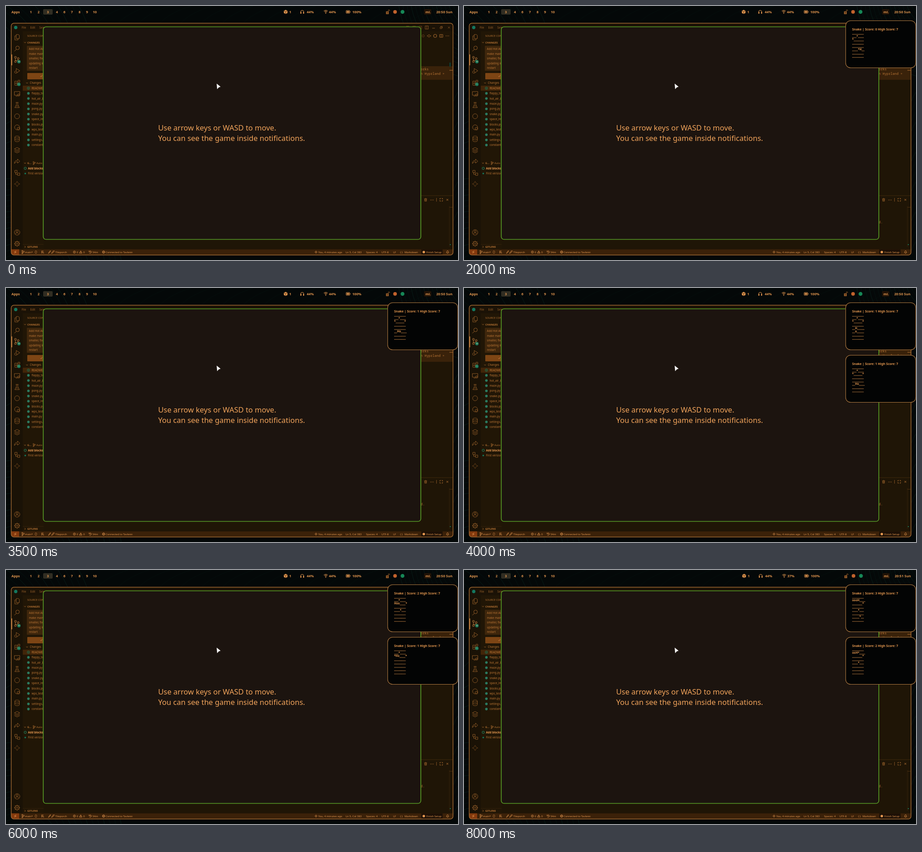
These frames come from a looping animation (998x561 px, 8.5 s). An HTML page with a canvas:

```html
<!DOCTYPE html>
<html lang="en">
<head>
<meta charset="utf-8">
<title>Snake in notifications</title>
<style>
html, body { margin: 0; width: 100%; height: 100%; overflow: hidden; background: #040808; }
canvas { display: block; }
</style>
</head>
<body>
<canvas id="stage" width="998" height="561"></canvas>
<script>
const ctx = document.getElementById('stage').getContext('2d');
const LOOP = 8500, STEP = 500;
const SANS = '"Noto Sans", "Open Sans", sans-serif';
const MONO = '"Noto Sans Mono", monospace';
const BRIGHT = '#e2964f', TEXT = '#b87434', DIM = '#98602a', FAINT = '#6a421b', TEAL = '#157a5c';

function text(str, x, y, size = 6.2, color = TEXT, weight = 400, family = SANS) {
  ctx.font = `${weight} ${size}px ${family}`;
  ctx.fillStyle = color;
  ctx.fillText(str, x, y + size * 0.35);
  return ctx.measureText(str).width;
}
function rect(x, y, w, h, color) {
  ctx.fillStyle = color;
  ctx.fillRect(x, y, w, h);
}
function panel(x, y, w, h, r, fill, stroke, lineWidth = 1) {
  ctx.beginPath();
  ctx.roundRect(x, y, w, h, r);
  if (fill) { ctx.fillStyle = fill; ctx.fill(); }
  if (stroke) { ctx.strokeStyle = stroke; ctx.lineWidth = lineWidth; ctx.stroke(); }
}
function disc(x, y, r, color) {
  ctx.beginPath();
  ctx.arc(x, y, r, 0, 7);
  ctx.fillStyle = color;
  ctx.fill();
}
function ring(x, y, r, color = DIM, w = 0.9, from = 0, to = Math.PI * 2) {
  ctx.beginPath();
  ctx.arc(x, y, r, from, to);
  ctx.strokeStyle = color;
  ctx.lineWidth = w;
  ctx.stroke();
}
// SVG path data placed at x, y
function path(x, y, d, color = DIM, w = 0.9, filled = false) {
  const p = new Path2D(d);
  ctx.save();
  ctx.translate(x, y);
  ctx.strokeStyle = ctx.fillStyle = color;
  ctx.lineWidth = w;
  if (filled) ctx.fill(p); else ctx.stroke(p);
  ctx.restore();
}
function branch(x, y, s, color) {
  ring(x - 2 * s, y - 3.5 * s, 1.5 * s, color, 0.8);
  ring(x - 2 * s, y + 3.5 * s, 1.5 * s, color, 0.8);
  ring(x + 2.5 * s, y - 1.5 * s, 1.5 * s, color, 0.8);
  path(x, y, `M${-2 * s} ${-2 * s}V${2 * s}Q${2.5 * s} ${2 * s} ${2.5 * s} 0`, color, 0.8);
}

function wallpaper() {
  rect(0, 0, 998, 561, '#040808');
  for (let i = 0; i < 16; i++) {
    const shade = i % 3 ? '#071613' : '#0a211c';
    ring(-70, 130, 70 + i * 13, shade, 0.8, -1.4, 1.2);
    ring(1060, -30, 60 + i * 9, shade, 0.8);
    ring(30, 610, 50 + i * 12, shade, 0.8);
    path(200 + i * 46, 0, 'M0 40Q20 16 70 0', '#06110f', 0.8);
    path(988, 190 + i * 22, 'M0 20Q4 8 10 0', shade, 0.8);
  }
}

function topBar(step) {
  const dx = step >= 14 ? 1 : 0;
  const label = (s, x) => text(s, x, 13, 7.6, BRIGHT, 600);
  label('Apps', 12);
  panel(82, 7, 21, 12, 2, '#302d22');
  ctx.textAlign = 'center';
  [55, 72, 92.5, 112.5, 129, 145.5, 162.5, 179, 196].forEach((x, i) =>
    label(['1', '2', '3', '4', '6', '7', '8', '9', '10'][i], x));
  ctx.textAlign = 'left';

  ctx.save();
  ctx.translate(dx, 0);
  path(617.5, 13, 'M0-4.5L4-2.5V2.5L0 4.5L-4 2.5V-2.5Z', BRIGHT, 1, true);
  path(617.5, 13, 'M-4-2.5L0-.4L4-2.5M0-.4V4', '#1a1008', 0.7);
  label('1', 625.5);
  path(654, 13, 'M-3.5 3V0A3.5 3.5 0 0 1 3.5 0V3', BRIGHT, 1);
  rect(650, 13, 2.2, 4, BRIGHT);
  rect(656, 13, 2.2, 4, BRIGHT);
  label('44%', 664);
  for (const r of [2.5, 4.5, 6.5]) ring(706, 16, r, BRIGHT, 1, -2.3, -0.84);
  disc(706, 16, 1, BRIGHT);
  label(step >= 15 ? '37%' : '44%', 713);
  panel(751, 10, 8, 6, 1, null, BRIGHT);
  rect(752.3, 11.3, 5.4, 3.4, BRIGHT);
  rect(759.5, 12, 1, 2, BRIGHT);
  label('100%', 764.7);
  rect(839, 12, 6, 6, '#a0622c');
  path(845, 10, 'M-1 2V0A1.5 1.5 0 0 1 2 0V1', '#a0622c', 1);
  path(842, 15, 'M-2 0H2M0-2V2', '#24150a', 0.7);
  disc(859, 13, 4, '#c2622c');
  disc(875.5, 13, 4.2, '#168857');
  panel(923, 7, 16, 12, 2, '#211307');
  label('ml.', 926);
  label(step >= 14 ? '20:51 Sun' : '20:50 Sun', 950);
  ctx.restore();
}

function activityBar() {
  const x = 24.5;
  path(x, 69, 'M-2-6H3L5-4V3H-2ZM-2-3H-5V6H2V3');
  ring(x + 1, 92.5, 4, DIM, 1);
  path(x, 94, 'M-2 2L-6 6', DIM, 1);
  rect(12, 107, 1.5, 24, BRIGHT);
  branch(x - 1, 118, 1.35, BRIGHT);
  path(x, 144, 'M-2-6L6-1L-1 4M-2-6V-1');
  ring(x - 3, 146, 2.5);
  path(x, 169, 'M-5-3H0V6H-5ZM-5 1.5H5V6H0M2-5H6V-1H2Z');
  path(x, 194, 'M-6-5H6V3H-6ZM-3 5H1');
  ring(x + 3.5, 196.5, 2.5);
  path(x, 219, 'M-3-6H3M-1.5-6V-1L-5 5.5H5L1.5-1V-6M-3 2H3');
  ring(x, 243.5, 5.5);
  ring(x, 268, 5.5);
  ring(x + 3, 271, 3);
  path(x, 293.5, 'M-5-4C-5-7 5-7 5-4S-5-1-5-4V4C-5 7 5 7 5 4V-4M-5 0C-5 3 5 3 5 0');
  path(x, 318.5, 'M0-6L6-3L0 0L-6-3ZM-6 0L0 3L6 0M-6 3L0 6L6 3');
  path(x, 343, 'M-6 5C-6-1-2-2 1-2V-5L6 0L1 4V1C-2 1-4 2-6 5');
  path(x, 368, 'M-5-5H0V0H-5ZM1 1H6V6H1ZM-3 0V4H1');
  path(x, 393, 'M0-6L2-2L6 0L2 2L0 6L-2 2L-6 0L-2-2Z', FAINT);
  ring(x, 500, 6);
  ring(x, 498, 2.2);
  path(x, 500, 'M-4 4C-3 0 3 0 4 4');
  ring(x, 525, 4.5, DIM, 1.2);
  ring(x, 525, 1.7);
  for (let a = 0; a < 8; a++) {
    const c = Math.cos(a * Math.PI / 4), s = Math.sin(a * Math.PI / 4);
    path(x, 525, `M${4.5 * c} ${4.5 * s}L${6.3 * c} ${6.3 * s}`, DIM, 1.4);
  }
  ctx.textAlign = 'center';
  for (const [y, count] of [[123, '12'], [173, '1']]) {
    disc(28.5, y, 3.7, TEAL);
    text(count, 28.5, y, 4, '#d7b58c', 600);
  }
  ctx.textAlign = 'left';
}

function sideBar() {
  const chevron = (x, y, d = 'M-2-1L0 1L2-1') => path(x, y, d, TEXT, 0.8);
  text('SOURCE CONTROL', 47, 66, 5.8);
  chevron(42, 80.5);
  text('CHANGES', 47, 80.5, 5.8, TEXT, 700);
  panel(46, 88, 60, 55, 1, '#3e260c');
  ['Add Hot Air', 'make main', 'smaller, fix', 'updating in', 'restart'].forEach((s, i) =>
    text(s, 50.5, 95.3 + i * 10.45, 6.2));
  panel(47, 148, 60, 14, 1, '#7d4514');
  path(78, 155, 'M-2 0L-.5 1.5L2-2', BRIGHT, 0.8);
  chevron(46.5, 170);
  text('Changes', 52.5, 170);
  rect(37, 176, 60, 11, '#422509');
  ['README.md', 'flappy_bird.py', 'hot_air_balloon.py', 'maze.py', 'pong.py', 'snake.py', 'space_invaders.py',
    'blocks.py', 'wps_test.py', 'main.py', 'settings.py', 'constants.py'].forEach((s, i) => {
    const y = 181.5 + i * 11.42;
    if (i) disc(49.5, y, 2.8, '#2b7a60');
    else { ring(49.5, y, 2.7, TEAL, 1); rect(49, y - 1, 1, 2.5, TEAL); }
    text(s, 56.5, y, 6.2, i ? TEXT : '#c47c38');
  });
  chevron(42, 347);
  text('G...', 47, 347, 5.8, TEXT, 700);
  branch(62, 347, 0.7, TEXT);
  text('Auto', 67, 347, 5.8);
  ring(42.5, 358.5, 2.5, '#20906a', 1);
  text('Add blocks,', 48.5, 358.5, 6.2, BRIGHT, 600);
  disc(42.5, 370, 1.8, TEAL);
  text('First version', 48.5, 370);
  rect(37, 526, 46, 0.7, '#3a240d');
  chevron(42, 532, 'M-1-2L1 0L-1 2');
  text('GITLENS', 47, 532, 5.6, TEXT, 600);
}

function editor(step) {
  rect(916, 133, 71, 30, '#3a220a');
  rect(979, 125, 3, 9, '#0e3b30');
  rect(979, 141.5, 8, 1, TEXT);
  text('orks', 915.5, 139, 7.3, TEXT, 400, MONO);
  text('n Hyprland +', 915.5, 149, 7.3, TEXT, 400, MONO);
  rect(916, 418.5, 71, 0.8, '#49300f');
  rect(978.5, 442, 0.8, 90, '#3b260d');
  rect(979, 444, 7, 1, '#4b2e10');
  rect(980, 526, 2, 2, TEAL);
  if (step) text('d.', 915.5, 477, 7.3, TEXT, 400, MONO);

  path(929, 47.5, 'M-3.5-3.5H3.5V3.5H-3.5ZM0-3.5V3.5', DIM, 0.8);
  path(887, 47.5, 'M-3-3H3V3H-3ZM-1-3V3', FAINT, 0.8);
  path(901, 47.5, 'M-3-3H3V3H-3ZM-3 1H3', FAINT, 0.8);
  path(915, 47.5, 'M-3-3H3V3H-3ZM1-3V3', FAINT, 0.8);
  path(944, 49, 'M-3 0H3', DIM, 0.9);
  path(961, 47.5, 'M-2.5-1H1V2.5H-2.5ZM-1-1V-2.5H2.5V1H1', DIM, 0.8);
  path(978, 47.5, 'M-2-2L2 2M2-2L-2 2', DIM, 0.8);
  ring(921, 66, 2.5, FAINT);
  ring(934, 66, 2.5, DIM);
  path(934, 66, 'M-5 0H-2.5M2.5 0H5', DIM, 0.8);
  ring(947.5, 66, 3.5, TEXT, 1);
  path(961, 66, 'M-3.5-3H3.5V3H-3.5ZM0-3V3', TEXT, 0.8);
  const dots = (x, y) => [-3, 0, 3].forEach(d => disc(x + d, y, 0.7, TEXT));
  dots(974.5, 66);
  dots(940.5, 428.5);
  path(926.5, 428, 'M-3-2H3M-1-3H1M-2-2V3H2V-2M0-1V2', TEXT, 0.8);
  rect(950, 424, 0.8, 8, DIM);
  path(961, 428, 'M-3-1V-3H-1M1-3H3V-1M3 1V3H1M-1 3H-3V1', TEXT, 0.9);
  path(974.5, 428, 'M-2-2L2 2M2-2L-2 2', TEXT, 0.9);
}

function statusBar() {
  const y = 543.5, item = (s, x) => text(s, x, y, 5.9, BRIGHT);
  rect(12, 537.5, 975, 12, '#3b2109');
  rect(12, 537.5, 17, 12, '#853a0e');
  path(20.5, y, 'M2-3L-2 0H2L-2 3', BRIGHT, 0.8);
  branch(37.5, y, 0.75, BRIGHT);
  item('main*', 42);
  ring(66, y, 2.4, BRIGHT, 0.8, 0.3, 2.9);
  ring(66, y, 2.4, BRIGHT, 0.8, 3.5, 6);
  path(81, y, 'M-2-3V3M-2-2H2M-2 1H2M2 1V3', BRIGHT, 0.9);
  path(96.5, y, 'M-3 3L0-2L2-3L1 0L-3 3', BRIGHT, 0.8);
  path(103.5, y, 'M-3 3L0-2L3-3L2 0Z', BRIGHT, 0.8);
  item('Tileporch', 109);
  ring(151, y, 2.5, BRIGHT, 0.8);
  path(151, y, 'M-1-1L1 1M1-1L-1 1', BRIGHT, 0.7);
  item('0', 156);
  path(165, y, 'M0-2.7L3 2.3H-3ZM0-1V1', BRIGHT, 0.8);
  item('0', 170.5);
  ring(186, y, 2.6, BRIGHT, 0.8, -2.6, 2.7);
  path(186, y, 'M0-1.5V0H1.5M-3-3V-1H-1', BRIGHT, 0.7);
  item('54m', 191);
  ring(215.5, y, 2.7, BRIGHT, 0.8);
  path(215.5, y, 'M-2.7 0H2.7M0-2.7C-2-1-2 1 0 2.7C2 1 2-1 0-2.7', BRIGHT, 0.6);
  item('Connected to Tavlenn', 220);
  ring(684.5, y, 1.5, BRIGHT, 0.8);
  path(684.5, y, 'M0-3V-1.5M0 1.5V3M-3 0H-1.5M1.5 0H3', BRIGHT, 0.7);
  item('You, 4 minutes ago', 689.5);
  item('Ln 5, Col 383', 750);
  item('Spaces: 4', 795);
  item('UTF-8', 829);
  item('LF', 855);
  item('{ }', 870);
  item('Markdown', 880);
  rect(917, 537.5, 47, 12, '#1d1006');
  disc(922.5, y, 2.8, BRIGHT);
  item('Finish Setup', 928);
  path(975, y, 'M-2.5 1.5C-1.5 0-2-3 0-3S1.5 0 2.5 1.5ZM-.7 2.8H.7', BRIGHT, 0.8);
}

function ideWindow(step) {
  ctx.save();
  panel(11.5, 38, 975.5, 512, 6, '#1f1506');
  ctx.clip();
  rect(12, 38, 975, 18, '#1b1206');
  rect(12, 56, 25, 482, '#1a1206');
  rect(37, 56, 46, 482, '#211606');
  disc(21.5, 47.5, 3.7, '#14775f');
  text('File', 34.5, 47.5, 6.2, DIM);
  text('Edit', 53.5, 47.5, 6.2, DIM);
  text('Selection', 73.5, 47.5, 6.2, DIM);
  activityBar();
  sideBar();
  editor(step);
  statusBar();
  ctx.restore();
  panel(11.5, 38, 975.5, 512, 6, null, '#9d6630', 1.5);
}

function gameDialog() {
  panel(82.3, 46, 833.6, 469.5, 6, '#1c140f', '#579a25', 1.7);
  text('Use arrow keys or WASD to move.', 336, 269.2, 16.5, '#f0a35b');
  text('You can see the game inside notifications.', 336, 292.7, 16.5, '#f0a35b');
  path(465.5, 172, 'M0 0L7.8 6.3Q5 7 3.6 8L1 11.2Z', '#fff', 1, true);
  path(465.5, 172, 'M0 0L7.8 6.3Q5 7 3.6 8L1 11.2Z', '#fff', 0.6);
}

const TURNS = { R: [0, 1], L: [0, -1], U: [-1, 0], D: [1, 0] };
const trail = [[4, 4]];
for (const turn of 'RRDLLLLUUULLURRR') {
  const [row, col] = trail[trail.length - 1], [dr, dc] = TURNS[turn];
  trail.push([row + dr, col + dc]);
}
const MEALS = [5, 12, 16];
// row, column, first step, step when eaten
const FOOD = [[1, 3, 0, 16], [2, 0, 0, 12], [5, 4, 0, 5], [2, 7, 5, 99], [4, 4, 12, 99], [6, 5, 16, 99]];

function board(step, score) {
  const rows = Array.from({ length: 8 }, () => Array(8).fill('_'));
  for (const [r, c, from, to] of FOOD) if (step >= from && step < to) rows[r][c] = '*';
  for (let i = 0; i <= score; i++) {
    const [r, c] = trail[step - i];
    rows[r][c] = i ? 'o' : 'H';
  }
  return rows;
}

function notification(y, step) {
  const score = MEALS.filter(m => step >= m).length;
  panel(842.7, y + 0.5, 154.8, 104, 11, '#030404', '#b47c42', 1.1);
  text(`Snake | Score: ${score} High Score: 7`, 857, y + 19.2, 6.95, BRIGHT, 700);
  board(step, score).forEach((row, r) => {
    let x = 857;
    const line = y + 30.2 + r * 7.3;
    for (const cell of row) {
      if (cell === '_') {
        rect(x, line, 3.2, 0.8, '#d08a48');
        x += 3.2;
      } else {
        x += text(cell, x, line - 2.7, 6.2, BRIGHT, 700);
      }
    }
  });
}

// steps at which the previous notification is still on screen
const stacked = step => step === 2 || step === 3 || (step >= 8 && step <= 10) || step >= 12;

function draw(now) {
  const step = Math.floor((now % LOOP) / STEP);
  wallpaper();
  topBar(step);
  ideWindow(step);
  gameDialog();
  if (step) notification(32, step);
  if (stacked(step)) notification(148, step - 1);
}

let start;
function tick(now) {
  start ??= now;
  draw(now - start);
  requestAnimationFrame(tick);
}
draw(0);
requestAnimationFrame(tick);
</script>
</body>
</html>
```
